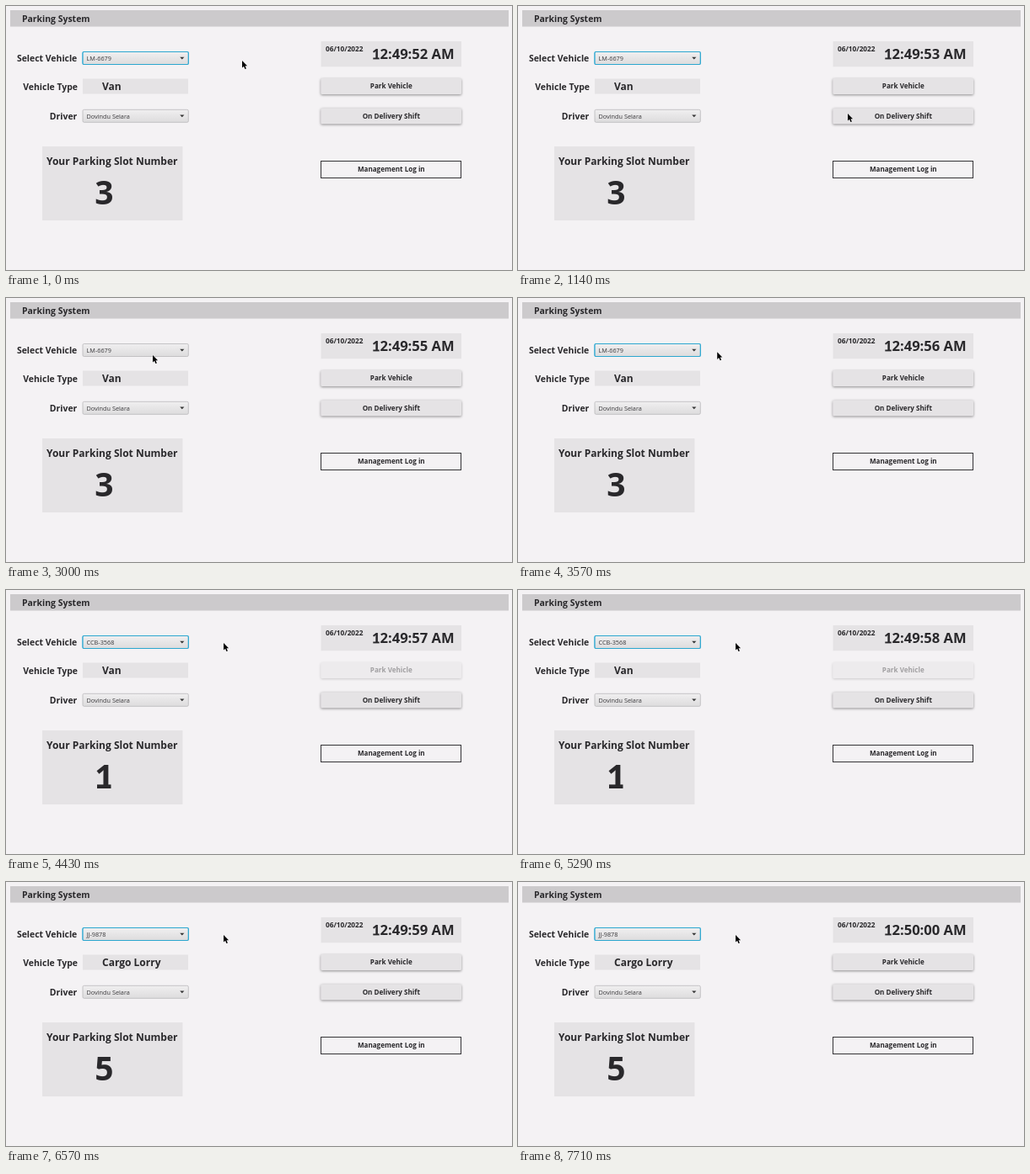
These frames come from a looping animation (600 by 314 pixels, 8 s). An HTML page:

```html
<!DOCTYPE html>
<html lang="en">
<head>
<meta charset="utf-8">
<title>Parking System</title>
<style>
  html, body { margin: 0; width: 100%; height: 100%; overflow: hidden; background: #f4f2f4; }
  svg { display: block; width: 600px; height: 314px; }
  text { font: 700 10.45px "Open Sans", "Noto Sans", sans-serif; fill: #29282b; white-space: pre; }
  .end { text-anchor: end; }
  .mid { text-anchor: middle; }
  text.small { font-size: 8.1px; }
  text.big { font-size: 12px; }
  text.clock { font-size: 16.6px; }
  text.slot { font-size: 39px; }
  text.item { font-size: 7.3px; font-weight: 400; fill: #3a393c; }
  .panel { fill: #e5e3e5; }
  .btn rect { fill: #e5e3e5; filter: drop-shadow(0 1.3px 1.6px rgba(0, 0, 0, .42)); }
  .btn.pressed rect { fill: #cccacc; }
  .btn.off { opacity: .4; }
  .combo rect { fill: url(#face); stroke: #b9b8ba; stroke-width: .8; }
  .combo.focus rect { stroke: #2ba6cf; stroke-width: 1.2; filter: drop-shadow(0 0 .6px #5cc3e4); }
</style>
</head>
<body>
<svg viewBox="0 0 600 314">
  <defs>
    <linearGradient id="face" x2="0" y2="1">
      <stop stop-color="#f0eff0"/>
      <stop offset="1" stop-color="#dddcdd"/>
    </linearGradient>
  </defs>
  <rect width="600" height="314" fill="#f4f2f4"/>
  <rect x="5" y="5" width="591" height="19.5" fill="#cccacc"/>
  <text x="19" y="18.8">Parking System</text>

  <text class="end" x="84.3" y="65.8">Select Vehicle</text>
  <text class="end" x="85" y="99.6">Vehicle Type</text>
  <text class="end" x="84.3" y="134.6">Driver</text>

  <g class="combo" id="vehicle">
    <rect x="91" y="54.5" width="125.3" height="15" rx="1.5"/>
    <text class="item" id="plate" x="95.5" y="64.7"></text>
    <path d="M206.2 60.7h5.2l-2.6 2.7z" fill="#333"/>
  </g>
  <rect class="panel" x="91" y="86.5" width="125" height="18"/>
  <text class="big" id="type" x="114" y="100.3"></text>
  <g class="combo">
    <rect x="91" y="123.3" width="125.3" height="15" rx="1.5"/>
    <text class="item" x="95.5" y="133.6">Dovindu Selara</text>
    <path d="M206.2 129.5h5.2l-2.6 2.7z" fill="#333"/>
  </g>

  <rect class="panel" x="43" y="167" width="166.5" height="88"/>
  <text class="big" x="48" y="189.2">Your Parking Slot Number</text>
  <text class="slot mid" id="slot" x="116.5" y="236"></text>
  <path id="foot" d="M108 231.4h16.5v4.6h-16.5z" fill="#29282b"/>

  <rect class="panel" x="373.5" y="42" width="166.5" height="30.3"/>
  <text x="379" y="54.4" style="font-size:8.25px">06/10/2022</text>
  <text class="clock" id="clock" x="434" y="63.4"></text>
  <path d="M435.3 61.5h7.4v1.9h-7.4z" fill="#29282b"/>

  <g class="btn" id="park">
    <rect x="373.3" y="86" width="166.7" height="19" rx="1.5"/>
    <text class="small mid" x="456.8" y="98.4">Park Vehicle</text>
  </g>
  <g class="btn" id="shift">
    <rect x="373.3" y="121.5" width="166.7" height="18.7" rx="1.5"/>
    <text class="small mid" x="456.8" y="133.6">On Delivery Shift</text>
  </g>
  <rect x="373.5" y="184.5" width="166" height="20" fill="none" stroke="#343336"/>
  <text class="small mid" x="456.8" y="197.4">Management Log in</text>

  <path id="cursor" d="M0 0V8.6L2 6.8 3.4 10 4.9 9.4 3.5 6.3 6.1 6.2Z" fill="#000" stroke="#fff" stroke-width=".5" paint-order="stroke"/>
</svg>
<script>
const LOOP = 8000, FPS = 7;
const $ = id => document.getElementById(id);

// time, x, y of the pointer
const path = [
  [0, 280, 65], [140, 280, 65], [1140, 391, 128], [1710, 424, 131],
  [2000, 424, 131], [2860, 174, 68], [3290, 174, 68], [3710, 258, 63]
];
// start time, plate, type, slot, can park
const picks = [
  [0, 'LM-6679', 'Van', 3, true],
  [4000, 'CCB-3568', 'Van', 1, false],
  [6000, 'JJ-9878', 'Cargo Lorry', 5, true]
];
const ticks = [290, 1290, 2290, 3290, 4290, 5290, 6290, 7430];

const within = (t, a, b) => t >= a && t < b;
const ease = k => k * k * (3 - 2 * k);

function pointer(t) {
  const n = path.findIndex(p => p[0] > t);
  if (n < 0) return path[path.length - 1].slice(1);
  const [t0, x0, y0] = path[n - 1], [t1, x1, y1] = path[n];
  const k = ease((t - t0) / (t1 - t0));
  return [x0 + (x1 - x0) * k, y0 + (y1 - y0) * k];
}

function clockText(t) {
  const s = 49 * 60 + 52 + ticks.filter(v => v <= t).length;
  const two = n => String(n).padStart(2, '0');
  return `12:${two(Math.floor(s / 60))}:${two(s % 60)} AM`;
}

function render(t) {
  const [, plate, type, slot, canPark] = picks.filter(p => p[0] <= t).pop();
  $('plate').textContent = plate;
  $('type').textContent = type;
  $('slot').textContent = slot;
  $('foot').style.display = slot === 1 ? '' : 'none';
  $('clock').textContent = clockText(t);
  $('park').classList.toggle('off', !canPark);
  $('shift').classList.toggle('pressed', within(t, 1570, 2000));
  $('vehicle').classList.toggle('focus', !within(t, 1570, 3290));
  $('cursor').setAttribute('transform', `translate(${pointer(t)})`);
}

let last = -1;
function loop() {
  const step = Math.floor((performance.now() % LOOP + 5) * FPS / 1000) % (LOOP * FPS / 1000);
  if (step !== last) render(Math.round(step * 100 / FPS) * 10);
  last = step;
  requestAnimationFrame(loop);
}
loop();
</script>
</body>
</html>
```
